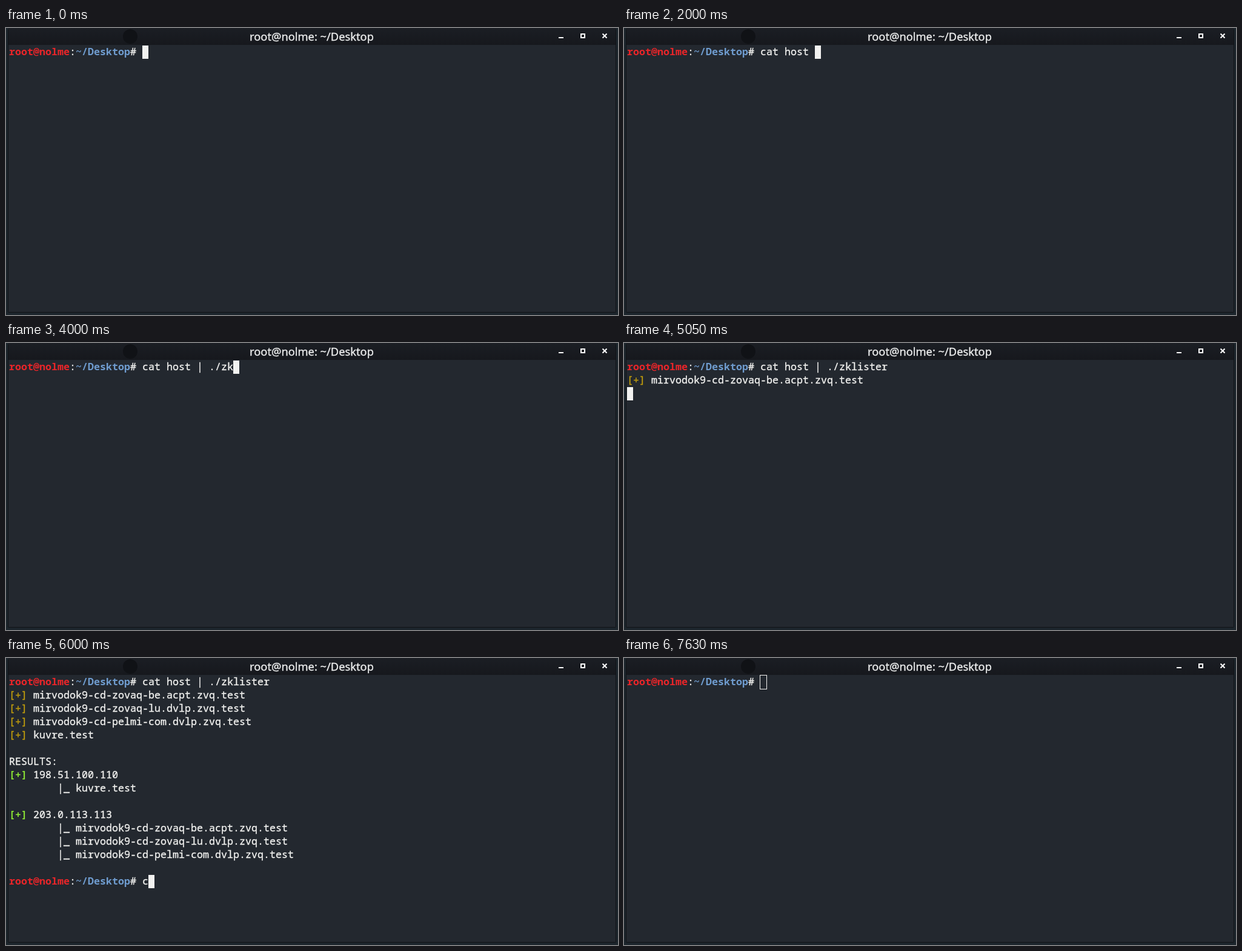
These frames come from a looping animation (1010 by 475 pixels, 7.68 s). An HTML page with a canvas:

```html
<!DOCTYPE html>
<html lang="en">
<head>
<meta charset="utf-8">
<title>Terminal</title>
<style>
  html, body { margin: 0; width: 100%; height: 100%; overflow: hidden; background: #1c252c; }
  canvas { display: block; }
</style>
</head>
<body>
<canvas id="stage" width="1010" height="475"></canvas>
<script>
const ctx = document.getElementById('stage').getContext('2d');

const LOOP = 7680;
const CELL = { x: 5, y: 29, w: 10, h: 22, base: 16 };
const COLOR = {
  white: '#f2f2f0', red: '#ea2529', blue: '#6f9ccf',
  yellow: '#c19d0c', green: '#8ae234', body: '#23282f', edge: '#101317'
};
const MONO = '16.667px "Noto Sans Mono", "DejaVu Sans Mono", monospace';

const USER = 'root@nolme';
const PATH = '~/Desktop';
const PROMPT_LEN = USER.length + PATH.length + 3;

const COMMAND = {
  text: 'cat host | ./zklister',
  keys: [320, 370, 950, 1000, 1210, 1370, 1470, 1790, 2000, 2420, 2470,
         3000, 3470, 3530, 4000, 4320, 4470, 4530, 4680, 4790, 5000]
};
const CLEAR = { text: 'clear', keys: [6000, 6470, 6580, 6740, 6890] };

const FIRST_HIT = 5050, MORE_HITS = 5420, DONE = 5470, WIPED = 7000, UNFOCUSED = 7630;
const CURSOR_OFF = [[160, 320], [5630, 5890], [7470, UNFOCUSED]];

const HOSTS = [
  'mirvodok9-cd-zovaq-be.acpt.zvq.test',
  'mirvodok9-cd-zovaq-lu.dvlp.zvq.test',
  'mirvodok9-cd-pelmi-com.dvlp.zvq.test',
  'kuvre.test'
];
const GROUPS = [
  { row: 7, ip: '198.51.100.110', hosts: HOSTS.slice(3) },
  { row: 10, ip: '203.0.113.113', hosts: HOSTS.slice(0, 3) }
];
const LAST_ROW = 15;

function rect(x, y, w, h, color) {
  ctx.fillStyle = color;
  ctx.fillRect(x, y, w, h);
}

// A hairline outline lifts regular text to a medium weight.
function mediumText(text, x, y, color) {
  ctx.fillStyle = ctx.strokeStyle = color;
  ctx.lineWidth = 0.35;
  ctx.fillText(text, x, y);
  ctx.strokeText(text, x, y);
}

// Every glyph sits on the terminal grid.
function print(row, col, text, color = COLOR.white, bold = false) {
  ctx.font = (bold ? '700 ' : '400 ') + MONO;
  ctx.textAlign = 'left';
  ctx.fillStyle = color;
  const y = CELL.y + row * CELL.h + CELL.base;
  [...text].forEach((ch, i) => {
    const x = CELL.x + (col + i) * CELL.w;
    if (bold) ctx.fillText(ch, x, y);
    else mediumText(ch, x, y, color);
  });
}

function drawWindow() {
  rect(0, 0, 1010, 475, '#1c252c');
  ctx.fillStyle = COLOR.edge;
  ctx.beginPath();
  ctx.roundRect(3, -1, 1004, 472, [5, 5, 2, 2]);
  ctx.fill();

  const bar = ctx.createLinearGradient(0, 0, 0, 28);
  bar.addColorStop(0, '#1b1e24');
  bar.addColorStop(1, '#16181d');
  rect(4, 0, 1002, 28, bar);
  rect(4, 28, 1002, 442, COLOR.body);

  ctx.fillStyle = '#101216';
  ctx.beginPath();
  ctx.arc(205, 14, 12, 0, Math.PI * 2);
  ctx.fill();

  ctx.font = '400 18.3px "Noto Sans", "Open Sans", sans-serif';
  ctx.textAlign = 'center';
  mediumText(`${USER}: ${PATH}`, 504.5, 21, '#eceded');
  drawButtons();
}

function drawButtons() {
  rect(912, 15, 8, 2, '#ffffff');
  ctx.strokeStyle = '#ffffff';
  ctx.lineWidth = 2;
  ctx.strokeRect(949, 10, 6, 6);
  ctx.beginPath();
  ctx.moveTo(984.5, 9.5);
  ctx.lineTo(991.5, 16.5);
  ctx.moveTo(991.5, 9.5);
  ctx.lineTo(984.5, 16.5);
  ctx.stroke();
}

// Prints the prompt with whatever is typed so far; returns the next free column.
function drawPrompt(row, t, entry) {
  const typed = entry ? entry.text.slice(0, entry.keys.filter(k => t >= k).length) : '';
  print(row, 0, USER, COLOR.red, true);
  print(row, USER.length, ':');
  print(row, USER.length + 1, PATH, COLOR.blue, true);
  print(row, PROMPT_LEN - 2, '#');
  print(row, PROMPT_LEN, typed);
  return PROMPT_LEN + typed.length;
}

function drawHits(count) {
  HOSTS.slice(0, count).forEach((host, i) => {
    print(i + 1, 0, '[+]', COLOR.yellow);
    print(i + 1, 4, host);
  });
}

function drawResults() {
  print(6, 0, 'RESULTS:');
  for (const { row, ip, hosts } of GROUPS) {
    print(row, 0, '[+]', COLOR.green, true);
    print(row, 4, ip);
    hosts.forEach((host, i) => print(row + 1 + i, 8, '|_ ' + host));
  }
}

function drawCursor(row, col, t) {
  if (CURSOR_OFF.some(([from, to]) => t >= from && t < to)) return;
  const x = CELL.x + col * CELL.w;
  const y = CELL.y + row * CELL.h;
  if (t >= UNFOCUSED) {
    ctx.strokeStyle = COLOR.white;
    ctx.lineWidth = 1;
    ctx.strokeRect(x - 0.5, y - 0.5, CELL.w + 1, CELL.h + 1);
  } else {
    rect(x, y, CELL.w, CELL.h, COLOR.white);
  }
}

function draw(t) {
  drawWindow();
  let row = 0;
  let col = drawPrompt(0, t, t < WIPED ? COMMAND : null);
  if (t >= FIRST_HIT && t < WIPED) {
    const hits = t < MORE_HITS ? 1 : t < DONE ? 3 : HOSTS.length;
    drawHits(hits);
    row = hits + 1;
    col = 0;
    if (t >= DONE) {
      drawResults();
      row = LAST_ROW;
      col = drawPrompt(row, t, CLEAR);
    }
  }
  drawCursor(row, col, t);
}

function frame() {
  draw(performance.now() % LOOP);
  requestAnimationFrame(frame);
}
frame();
</script>
</body>
</html>
```
